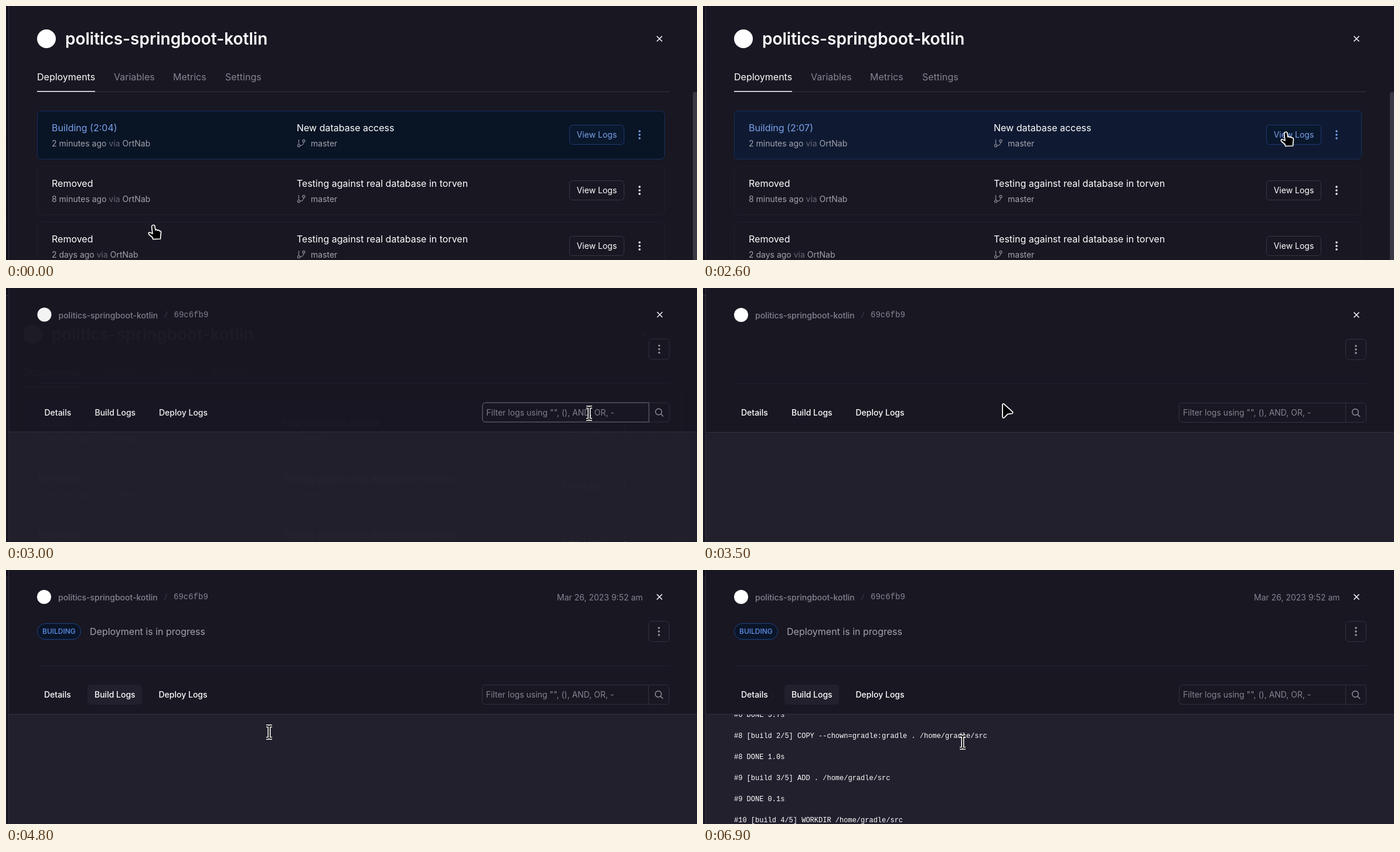
These frames come from a looping animation (1179 px wide and 434 px high, 8 s). An HTML page:

```html
<!DOCTYPE html>
<html lang="en">
<head>
<meta charset="utf-8">
<title>Deployments</title>
<style>
  html, body { margin: 0; width: 100%; height: 100%; overflow: hidden; background: #13111c; }
  svg { display: block; width: 1179px; height: 434px; }
  text { font-family: Inter, sans-serif; font-size: 16px; fill: #fff; white-space: pre; }
  .s { font-size: 14px; }
  .m { font-weight: 500; }
  .mono { font-family: "Liberation Mono", monospace; }
  .log { font-size: 12px; }
  .dim { fill: #85848f; }
  .sub { fill: #a3a2ac; }
  .line { fill: none; stroke: #33313d; }
</style>
</head>
<body>
<svg viewBox="0 0 1179 434" xmlns="http://www.w3.org/2000/svg">
  <defs>
    <clipPath id="logClip"><rect x="5" y="247" width="1174" height="187"/></clipPath>
    <g id="close"><path d="M-4.5-4.5l9 9m0-9l-9 9" stroke="#fff" stroke-width="1.5" fill="none"/></g>
    <g id="dots"><circle cy="-6" r="1.8"/><circle r="1.8"/><circle cy="6" r="1.8"/></g>
    <g id="branch" fill="none" stroke="#85848f" stroke-width="1.3">
      <path d="M2.5 0v8.5M11 4.5c0 4-3 6-6.3 6"/>
      <circle cx="2.5" cy="10.7" r="2"/><circle cx="11" cy="2.5" r="2"/>
    </g>
  </defs>

  <rect width="1179" height="434" fill="#13111c"/>
  <g id="under"><rect y="12" width="5" height="422" fill="#191722"/><path class="line" d="M0 12.5h5"/></g>

  <g id="list">
    <rect x="4" width="1175" height="434" fill="#191722"/>
    <path class="line" d="M4.5 0v434"/>
    <path d="M3.5 24v410" stroke="#2b2937" stroke-dasharray="1 27"/>
    <circle cx="69" cy="56" r="16" fill="#fff"/>
    <text x="101" y="66" style="font-size:28px;font-weight:600">politics-springboot-kotlin</text>
    <use href="#close" x="1115" y="56"/>
    <text x="53" y="127">Deployments</text>
    <text x="184" y="127" class="dim">Variables</text>
    <text x="285" y="127" class="dim">Metrics</text>
    <text x="374" y="127" class="dim">Settings</text>
    <path class="line" d="M53 146.5h1079"/>
    <path d="M53 146h99" stroke="#fff" stroke-width="1.4"/>
    <g id="cards"></g>
    <rect x="1172" y="147" width="8" height="300" rx="3" fill="#3a3843"/>
  </g>

  <g id="detail">
    <rect x="4" width="1175" height="434" fill="#191722"/>
    <circle cx="65" cy="46" r="12" fill="#fff"/>
    <text x="89" y="52" class="s m dim">politics-springboot-kotlin</text>
    <path d="M270 51.5l5-11" stroke="#44424e"/>
    <text x="286" y="50" class="s mono dim">69c6fb9</text>
    <use href="#close" x="1115" y="46"/>
    <rect class="line" x="1096.5" y="87.5" width="35" height="35" rx="6"/>
    <use href="#dots" x="1114" y="105" fill="#95949f"/>
    <path d="M53 163.5h1079" stroke="#23212d"/>
    <g id="loaded">
      <text x="940" y="52" class="s dim">Mar 26, 2023 9:52 am</text>
      <rect x="53.5" y="91.5" width="74" height="27" rx="13.5" fill="#0b1528" stroke="#1c4387"/>
      <text x="62" y="109" class="m" style="font-size:12px;fill:#5f93ee">BUILDING</text>
      <text x="143" y="111" class="sub">Deployment is in progress</text>
      <rect x="139" y="196" width="93" height="34" rx="6" fill="#22202d"/>
    </g>
    <text x="65" y="218" class="s m">Details</text>
    <text x="151" y="218" class="s m">Build Logs</text>
    <text x="260.5" y="218" class="s m">Deploy Logs</text>
    <rect class="line" x="812.5" y="196.5" width="319" height="33" rx="5"/>
    <path class="line" d="M1096.5 197v32"/>
    <path id="focus" d="M1096.5 196.5h-279a5 5 0 0 0-5 5v23a5 5 0 0 0 5 5h279z" fill="none" stroke="#6c6a77"/>
    <text x="819" y="218" class="s dim">Filter logs using "", (), AND, OR, -</text>
    <g fill="none" stroke="#95949f" stroke-width="1.4"><circle cx="1113" cy="212" r="5.3"/><path d="M1117 216l4 4"/></g>
    <rect x="4" y="246" width="1175" height="188" fill="#22202d"/>
    <path class="line" d="M4 246.5h1175M4.5 0v434"/>
    <g clip-path="url(#logClip)"><g id="logs"></g></g>
  </g>

  <g id="hand">
    <path d="M-2.5-11.5C-.8-12.2.7-11.3 1-9.5L2-3C3-4.2 5-4 5.4-2.5C6.8-3.6 8.5-3 8.8-1.5C10.4-2.2 11.6-1 11.5.8L10.8 7.5L10.5 12L-2.2 12.5L-3 9.5L-8.8 4.5C-10.8 2.5-9.5.4-7.2 1L-3 3L-4.4-8.8C-4.6-10.1-3.8-11.1-2.5-11.5Z"
      fill="#000" stroke="#fff" stroke-width="1.7" stroke-linejoin="round"/>
  </g>
  <g id="arrow">
    <path d="M0 1.5V21.5C0 24 2 24.7 3.6 23L8.6 17.6L15.6 16.6C17.8 16.2 18.2 14.5 16.8 13.1L3 .6C1.5-.6 0 0 0 1.5Z"
      fill="#000" stroke="#fff" stroke-width="1.8" stroke-linejoin="round"/>
  </g>
  <g id="beam" fill="none" stroke-linejoin="round">
    <path d="M-5-10.5h3.2L0-9.5l1.8-1H5M0-10V10M-5 10.5h3.2L0 9.5l1.8 1H5" stroke="#fff" stroke-width="5"/>
    <path d="M-5-10.5h3.2L0-9.5l1.8-1H5M0-10V10M-5 10.5h3.2L0 9.5l1.8 1H5" stroke="#000" stroke-width="1.8"/>
  </g>
</svg>
<script>
const $ = id => document.getElementById(id);
const LOOP = 8000;

const rows = [
  ["Building (2:04)", "2 minutes", "New database access"],
  ["Removed", "8 minutes", "Testing against real database in torven"],
  ["Removed", "2 days", "Testing against real database in torven"]
];
const card = ([status, age, title], i) => {
  const blue = i === 0;
  const ink = blue ? "#7aa2ec" : "#fff";
  return `<g transform="translate(0 ${i * 95})">
    <rect ${blue ? 'id="active"' : ""} x="53.5" y="179.5" width="1070" height="82" rx="6"
      fill="${blue ? "#091425" : "#191722"}" stroke="${blue ? "#15305f" : "#211f2b"}"/>
    <text ${blue ? 'id="status"' : ""} x="78" y="214" style="fill:${ink}">${status}</text>
    <text x="78" y="240" class="s sub">${age} ago <tspan fill="#676571">via</tspan> OrtNab</text>
    <text x="496" y="214">${title}</text>
    <use href="#branch" x="497" y="228"/>
    <text x="520" y="240" class="s sub">master</text>
    <rect ${blue ? 'id="button"' : ""} x="961.5" y="203.5" width="93" height="33" rx="5"
      fill="${blue ? "#0a182d" : "#191722"}" stroke="${blue ? "#1c3a74" : "#383642"}"/>
    <text x="1008" y="225" class="s" text-anchor="middle" style="fill:${ink}">View Logs</text>
    <use href="#dots" x="1081" y="220" fill="${ink}"/>
  </g>`;
};
$("cards").innerHTML = rows.map(card).join("");

const logLines = [
  "#7 DONE 0.2s",
  "#6 DONE 5.7s",
  "#8 [build 2/5] COPY --chown=gradle:gradle . /home/gradle/src",
  "#8 DONE 1.0s",
  "#9 [build 3/5] ADD . /home/gradle/src",
  "#9 DONE 0.1s",
  "#10 [build 4/5] WORKDIR /home/gradle/src"
];
$("logs").innerHTML = logLines.map((s, i) =>
  `<text x="53" y="${251 + i * 36}" class="mono log">${s}</text>`).join("");

// time, pointer kind, x, y
const pointer = [
  [0, "hand", 253, 386], [400, "hand", 262, 318], [500, "hand", 275, 207],
  [800, "hand", 330, 209], [900, "hand", 470, 211], [1000, "hand", 640, 214],
  [1100, "hand", 800, 219], [1200, "hand", 930, 224], [1300, "hand", 996, 227],
  [2800, "beam", 995, 214], [3400, "arrow", 690, 203], [3500, "arrow", 511, 198],
  [3800, "arrow", 506, 196], [3900, "arrow", 497, 192], [4000, "arrow", 481, 187],
  [4100, "arrow", 461.5, 184.5], [4200, "arrow", 456, 190], [4300, "arrow", 453, 202],
  [4400, "arrow", 451, 216], [4500, "arrow", 450, 231], [4600, "arrow", 450, 245],
  [4700, "beam", 449, 268], [4800, "beam", 449, 277], [5000, "beam", 447, 285],
  [5100, "beam", 446, 296], [5200, "beam", 445, 303], [6000, "beam", 444, 299],
  [6100, "beam", 443, 294]
];
// time, list shift, list scale, list opacity, detail shift, detail opacity
const swap = [
  [0, 0, 1, 1, 17, 0], [2800, 7, .999, .9, 17, .2], [2900, 17, .9985, .6, 5, .72],
  [3000, 23, .998, .4, .5, .95], [3100, 24, .998, 0, 0, 1]
];
const clock = [[0, "2:04"], [200, "2:05"], [1200, "2:06"], [2200, "2:07"]];

const at = (steps, t) => steps.filter(s => s[0] <= t).pop();
const show = (id, on) => $(id).style.display = on ? "" : "none";
const set = (id, name, value) => $(id).setAttribute(name, value);

function draw(t) {
  const [, kind, x, y] = at(pointer, t);
  for (const id of ["hand", "arrow", "beam"]) show(id, id === kind);
  set(kind, "transform", `translate(${x} ${y})`);

  const [, shift, scale, listAlpha, rise, detailAlpha] = at(swap, t);
  set("list", "transform", `translate(${-shift} ${shift}) scale(${scale} 1)`);
  set("list", "opacity", listAlpha);
  set("detail", "transform", `translate(${rise} ${-rise})`);
  set("detail", "opacity", detailAlpha);
  show("list", listAlpha > 0);
  show("detail", detailAlpha > 0);
  show("under", t >= 2900);

  $("status").textContent = `Building (${at(clock, t)[1]})`;
  set("active", "fill", t >= 500 ? "#0f1a32" : "#091425");
  set("button", "stroke", t >= 1300 && t < 2600 ? "#86abf2" : "#1c3a74");

  show("focus", t >= 3000 && t < 3400);
  show("loaded", t >= 3800);
  show("logs", t >= 5400);
  set("logs", "transform", `translate(0 ${t >= 6900 ? -36 : 0})`);
}

const start = performance.now();
function tick() {
  draw((performance.now() - start) % LOOP);
  requestAnimationFrame(tick);
}
tick();
</script>
</body>
</html>
```
